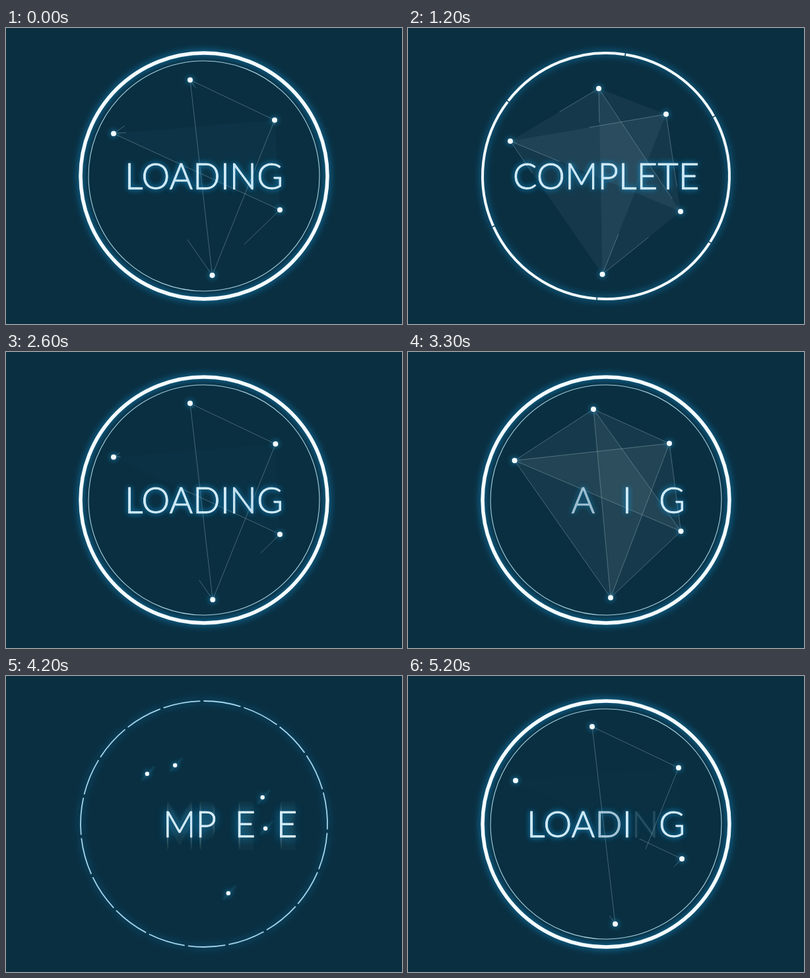
Animation, 600 px wide and 450 px high, one loop 5.3 s. Source, as an HTML page with a canvas:

```html
<!DOCTYPE html>
<html lang="en">
<head>
<meta charset="utf-8">
<title>Loading</title>
<style>
html, body { margin: 0; width: 100%; height: 100%; overflow: hidden; background: #0a2f41; }
canvas { display: block; width: 600px; height: 450px; }
</style>
</head>
<body>
<canvas id="stage" width="600" height="450"></canvas>
<script>
const ctx = document.getElementById('stage').getContext('2d');
const PERIOD = 2650, CX = 300, CY = 225, TAU = Math.PI * 2, DEG = Math.PI / 180;
const GLOW = '#1592d0';

const ramp = (t, start, length) => Math.min(1, Math.max(0, (t - start) / length));
const mix = (a, b, u) => a + (b - a) * u;
const easeOut = u => 1 - (1 - u) ** 3;
const blend = (from, to, u, alpha = 1) =>
  `rgba(${from.map((v, i) => Math.round(mix(v, to[i], u))).join()},${alpha})`;

// Slow drift of the five nodes while the network is open.
const DRIFT_TIMES = [-400, -100, 0, 650, 1200];
const nodes = [
  { x: [279.5, 279, 279, 281, 289], y: [72, 77, 79, 87, 92], swirl: -84, twist: 12.6, launch: 1745 },
  { x: [417, 410, 407, 396, 391], y: [139, 139.5, 140, 139, 131], swirl: 84, twist: 2.5, launch: 1751 },
  { x: [164, 163, 163, 161.5, 155], y: [156, 159, 160.5, 165, 172], swirl: 84, twist: -10, launch: 1743 },
  { x: [416, 415, 415, 413.5, 413], y: [281, 278, 276.5, 272.5, 279], swirl: -84, twist: -9, launch: 1731 },
  { x: [317, 314, 312.5, 307, 294.5], y: [379, 377, 376, 373.5, 374.5], swirl: -84, twist: -79, launch: 1748 }
];

// [from, to, growth time, end that is kept last, shrink time]
const edges = [
  [0, 1, 80, 0, 130], [0, 4, 85, 0, 156], [1, 4, 126, 4, 163], [3, 2, 180, 2, 167],
  [3, 4, 263, 4, 221], [4, 2, 380, 2, 162], [2, 0, 500, 0, 189], [2, 1, 680, 1, 198],
  [0, 3, 780, 0, 440], [1, 3, 820, 1, 280]
];

// [corners, fade-in start, fade-in length]
const faces = [
  [[2, 1, 3], -110, 220], [[0, 1, 4], 100, 450], [[2, 3, 4], 130, 450], [[0, 2, 3], 160, 450]
];

const words = [
  { text: 'LOADING', fadeIn: [2200, 2260, 2340, 2508, 2400, 2544, 2300],
    fadeOut: [500, 540, 630, 560, 730, 585, 690] },
  { text: 'COMPLETE', fadeIn: [780, 900, 820, 1000, 860, 1060, 940, 1100],
    fadeOut: [1400, 1430, 1590, 1620, 1480, 1560, 1460, 1640] }
];

function spline(times, values, t) {
  const last = times.length - 1;
  t = Math.min(times[last], Math.max(times[0], t));
  let i = 0;
  while (i < last - 1 && t > times[i + 1]) i++;
  const slope = k => {
    const a = Math.max(0, k - 1), b = Math.min(last, k + 1);
    return (values[b] - values[a]) / (times[b] - times[a]);
  };
  const h = times[i + 1] - times[i], u = (t - times[i]) / h;
  return values[i] * (1 + 2 * u) * (1 - u) ** 2 + values[i + 1] * u * u * (3 - 2 * u)
    + h * (slope(i) * u * (1 - u) ** 2 - slope(i + 1) * u * u * (1 - u));
}

function nodeAt(node, t) {
  const emerging = t > 1695;
  const local = emerging ? t - PERIOD : t;
  const dx = spline(DRIFT_TIMES, node.x, local) - CX;
  const dy = spline(DRIFT_TIMES, node.y, local) - CY;
  const spread = emerging ? easeOut(ramp(t, node.launch, 500)) : 1 - ramp(t, 1250, 440) ** 3.6;
  const angle = (emerging ? node.twist : node.swirl) * (1 - spread) * DEG;
  const c = Math.cos(angle) * spread, s = Math.sin(angle) * spread;
  return [CX + dx * c - dy * s, CY + dx * s + dy * c];
}

function withGlow(color, blur, draw) {
  ctx.save();
  ctx.shadowColor = color;
  ctx.shadowBlur = blur;
  draw();
  ctx.restore();
}

function line(a, b) {
  ctx.beginPath();
  ctx.moveTo(a[0], a[1]);
  ctx.lineTo(b[0], b[1]);
  ctx.stroke();
}

function arc(radius, from, to) {
  ctx.beginPath();
  ctx.arc(CX, CY, radius, from, to);
  ctx.stroke();
}

function drawOuterRing(t) {
  if (t > 1700) {
    const radius = 187 * easeOut(ramp(t, 1680, 256));
    const heat = 1 - ramp(t, 1850, 350);
    ctx.strokeStyle = '#f4fcff';
    ctx.lineWidth = mix(5.5, 4.2, heat);
    withGlow(heat > 0.5 ? '#1687d8' : GLOW, 12, () => {
      arc(radius, 0, TAU);
      if (heat > 0) { ctx.globalAlpha = heat * 0.5; arc(radius, 0, TAU); }
    });
    return;
  }
  const u = (t - 1200) / 350;
  ctx.strokeStyle = blend([244, 252, 255], [165, 214, 238], ramp(t, 1200, 350));
  ctx.lineWidth = u < 0 ? mix(5.5, 4, ramp(t, 900, 300)) : mix(4, 1.8, u);
  withGlow(GLOW, 12, () => {
    if (t < 1120) return arc(187, 0, TAU);
    const step = Math.max(3, mix(61.7, 19.1, u));
    const gap = Math.max(0.1, mix(0.5, 1.6, u));
    const first = mix(331.1, 325.4, u);
    ctx.beginPath();
    for (let a = 0; a < 357; a += step) {
      const from = (first + a + gap / 2) * DEG;
      const to = (first + Math.min(360, a + step) - gap / 2) * DEG;
      ctx.moveTo(CX + 187 * Math.cos(from), CY + 187 * Math.sin(from));
      ctx.arc(CX, CY, 187, from, to);
    }
    ctx.stroke();
  });
}

function drawInnerRing(t) {
  const opening = t > 1690;
  const sweep = 360 * (opening ? ramp(t, 1690, 249) : 1 - ramp(t, 780, 370) ** 2);
  if (sweep <= 0) return;
  const radius = opening ? 175 * easeOut(ramp(t, 1680, 328)) : 175;
  const brightness = opening ? mix(0.65, 1, ramp(t, 1800, 250)) : 1;
  ctx.strokeStyle = `rgba(169,207,219,${brightness})`;
  ctx.lineWidth = 1.1;
  arc(radius, (291 - sweep / 2) * DEG, (291 + sweep / 2) * DEG);
}

function drawNetwork(t, points) {
  const local = t > 1695 ? t - PERIOD : t;
  for (const [corners, start, length] of faces) {
    const alpha = 0.062 * ramp(local, start, length) * (1 - ramp(local, 1190, 200));
    if (alpha <= 0) continue;
    ctx.fillStyle = blend([70, 190, 210], [205, 218, 225], ramp(local, 0, 400), alpha);
    ctx.beginPath();
    corners.forEach(i => ctx.lineTo(...points[i]));
    ctx.fill();
  }
  ctx.strokeStyle = 'rgba(185,208,218,0.43)';
  ctx.lineWidth = 0.8;
  for (const [from, to, growth, keep, shrink] of edges) {
    const leaving = local > 1060;
    const part = leaving ? 1 - ramp(local, 1060, shrink) ** 2 : ramp(local, -190, growth) ** 2;
    if (part <= 0.002) continue;
    const origin = leaving ? keep : from;
    const a = points[origin], b = points[origin === from ? to : from];
    line(a, [mix(a[0], b[0], part), mix(a[1], b[1], part)]);
  }
}

function drawNodes(t, points) {
  let radius = 4;
  if (t > 1695) radius = 4 * easeOut(ramp(t, 1740, 500));
  else if (t > 1400) radius = mix(4, 3.2, ramp(t, 1400, 150)) * (1 - ramp(t, 1560, 130));
  if (radius <= 0) return;
  const streak = t < 1695 ? ramp(t, 1400, 120) * (1 - ramp(t, 1600, 90)) : 0;
  for (const [x, y] of points) {
    withGlow('#26a5df', 9, () => {
      if (streak > 0) {
        ctx.strokeStyle = `rgba(70,165,200,${0.1 * streak})`;
        ctx.lineWidth = 4;
        line([x - 8, y + 10], [x + 11, y - 11]);
      }
      ctx.fillStyle = '#f4fcff';
      ctx.beginPath();
      ctx.arc(x, y, radius, 0, TAU);
      ctx.fill();
    });
  }
}

function drawWord({ text, fadeIn, fadeOut }, t) {
  const left = CX - ctx.measureText(text).width / 2;
  const burst = text === 'COMPLETE' ? ramp(t, 1400, 120) : 0;
  ctx.fillStyle = ctx.strokeStyle = '#e9f7ff';
  ctx.lineWidth = 0.8;
  [...text].forEach((letter, i) => {
    const shown = ramp(t, fadeIn[i], 60), hidden = ramp(t, fadeOut[i], 60);
    const alpha = fadeIn[i] < fadeOut[i] ? shown - hidden : Math.max(shown, 1 - hidden);
    if (alpha <= 0) return;
    const x = left + ctx.measureText(text.slice(0, i + 1)).width - ctx.measureText(letter).width;
    if (burst > 0) {
      ctx.globalAlpha = alpha * burst * 0.014;
      for (let shift = -16; shift <= 20; shift++) ctx.fillText(letter, x, 245 + shift);
    }
    ctx.globalAlpha = alpha;
    withGlow(GLOW, 9 + 5 * burst, () => {
      ctx.fillText(letter, x, 245);
      ctx.strokeText(letter, x, 245);
    });
    ctx.globalAlpha = 1;
  });
}

function render() {
  const t = performance.now() % PERIOD;
  ctx.fillStyle = '#0a2f41';
  ctx.fillRect(0, 0, 600, 450);
  ctx.font = '300 54.5px Lato, "Lato Light", sans-serif';
  const points = nodes.map(node => nodeAt(node, t));
  drawOuterRing(t);
  drawInnerRing(t);
  drawNetwork(t, points);
  words.forEach(word => drawWord(word, t));
  drawNodes(t, points);
  requestAnimationFrame(render);
}
render();
</script>
</body>
</html>
```
